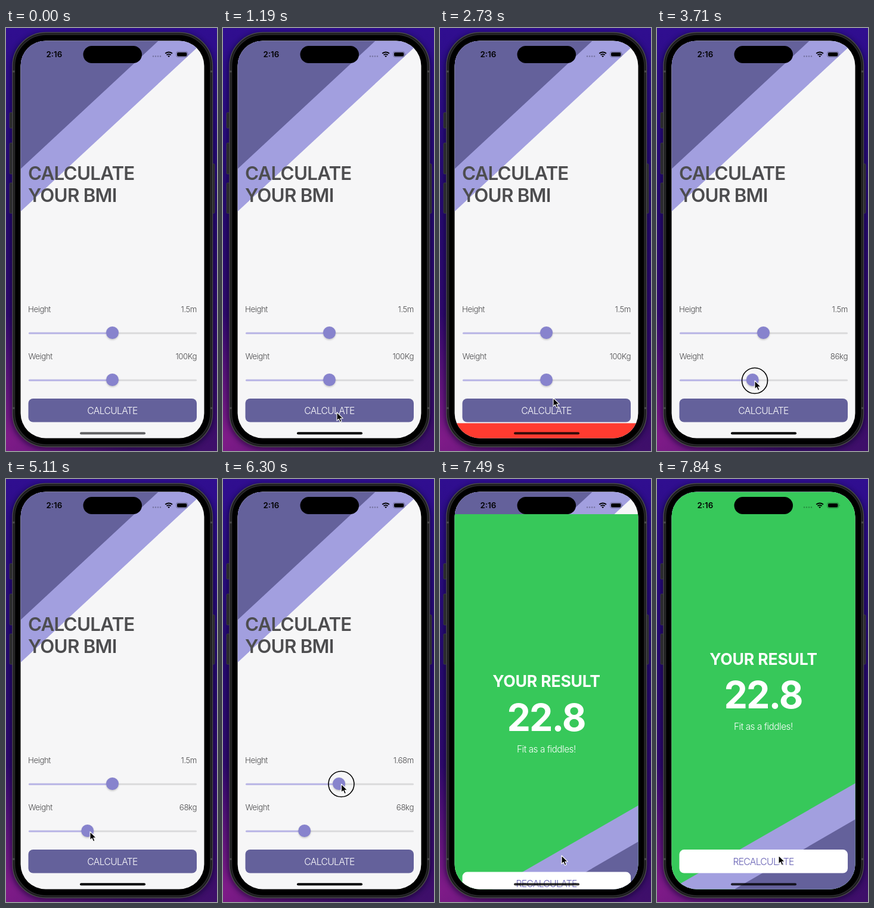
These frames come from a looping animation (354 by 710 pixels, 8000 ms). An HTML page:

```html
<!DOCTYPE html>
<html lang="en">
<head>
<meta charset="utf-8">
<title>BMI calculator</title>
<style>
  html, body { margin: 0; width: 100%; height: 100%; overflow: hidden; background: #2d0b72; }
  svg { display: block; width: 354px; height: 710px; }
  text { font-family: Inter, "Liberation Sans", sans-serif; }
  .title { font-size: 31.3px; font-weight: 600; letter-spacing: -.024em; fill: #4d4d4f; }
  .label { font-size: 13.3px; font-weight: 300; letter-spacing: -.032em; fill: #4a4a4c; }
  .button { font-size: 15.66px; font-weight: 350; letter-spacing: -.043em; text-anchor: middle; }
  .result { fill: #fff; text-anchor: middle; }
  .end { text-anchor: end; }
</style>
</head>
<body>
<svg viewBox="0 0 354 710">
  <defs>
    <linearGradient id="wall" x2="0" y2="1">
      <stop offset="0" stop-color="#300e90"/>
      <stop offset=".4" stop-color="#260a70"/>
      <stop offset=".75" stop-color="#32096c"/>
      <stop offset="1" stop-color="#3f0f6a"/>
    </linearGradient>
    <radialGradient id="glow" gradientUnits="userSpaceOnUse" cx="0" cy="690" r="210">
      <stop offset="0" stop-color="#7f1b88"/>
      <stop offset="1" stop-color="#7f1b88" stop-opacity="0"/>
    </radialGradient>
    <filter id="blur" x="-20%" width="140%"><feGaussianBlur stdDeviation="5"/></filter>
    <filter id="soft" x="-50%" y="-50%" width="200%" height="200%"><feGaussianBlur stdDeviation="1.4"/></filter>
    <clipPath id="screen"><rect x="24.5" y="21.5" width="308" height="667" rx="42"/></clipPath>
  </defs>

  <rect width="354" height="710" fill="url(#wall)"/>
  <rect width="354" height="710" fill="url(#glow)"/>
  <rect x="9" y="9" width="339" height="697" rx="57" fill="#0c0325" opacity=".65" filter="url(#blur)"/>

  <g fill="#29292c" stroke="#424245" stroke-width=".8">
    <rect x="6" y="142" width="7" height="26" rx="1.5"/>
    <rect x="6" y="193" width="7" height="52" rx="1.5"/>
    <rect x="6" y="260" width="7" height="51" rx="1.5"/>
    <rect x="344" y="228" width="6" height="83" rx="1.5"/>
  </g>
  <rect x="11" y="7.5" width="335.5" height="695.5" rx="56" fill="#1b1b1d" stroke="#4a4a4d" stroke-width="1.4"/>
  <rect x="14.5" y="11" width="328.5" height="688.5" rx="53" fill="#000" stroke="#2c2c2e" stroke-width="1.5"/>
  <path d="M10.5 73h4M343 73h4M10.5 638h4M343 638h4" stroke="#4a4a4c" stroke-width="3"/>

  <g clip-path="url(#screen)">
    <rect x="24" y="21" width="309" height="668" fill="#f6f6f7"/>
    <path d="M24.5 21.5H333L24.5 308z" fill="#a29fdf"/>
    <path d="M24.5 21.5H255.7L24.5 236.4z" fill="#64619b"/>
    <text class="title" x="37" y="254.5">CALCULATE</text>
    <text class="title" x="37" y="291.5">YOUR BMI</text>

    <text class="label" x="37" y="477">Height</text>
    <text class="label end" x="320" y="477" id="heightText"></text>
    <text class="label" x="37.5" y="556">Weight</text>
    <text class="label end" x="320" y="556" id="weightText"></text>
    <g id="height" transform="translate(0 511.5)"></g>
    <g id="weight" transform="translate(0 590.5)"></g>

    <rect x="37.5" y="622" width="282.5" height="39.5" rx="8" fill="#64619b"/>
    <text class="button" x="178.5" y="647.5" fill="#fff">CALCULATE</text>

    <g id="modal">
      <rect id="sheet" x="24" y="21.5" width="309" height="669"/>
      <path d="M24.5 687.5L333 510.3V690H24.5z" fill="#a29fdf"/>
      <path d="M131 688L333 571V690H131z" fill="#64619b"/>
      <text class="result" x="178.5" y="311.5" font-size="26.6" font-weight="700" letter-spacing="-.2">YOUR RESULT</text>
      <text class="result" x="178" y="385" font-size="62.6" font-weight="700" letter-spacing="-1.9" id="score"></text>
      <text class="result" x="178.5" y="421" font-size="15.3" font-weight="300" letter-spacing="-.46" id="advice"></text>
      <rect x="37.5" y="622" width="282.5" height="39.5" rx="8" fill="#fff"/>
      <text class="button" x="178.5" y="647.5" fill="#625cb2">RECALCULATE</text>
    </g>

    <rect id="home" x="124" y="678.2" width="110" height="4" rx="2"/>
  </g>

  <rect x="129.5" y="30" width="98.5" height="29" rx="14.5"/>
  <text x="67.5" y="49" font-size="13.3" font-weight="600">2:16</text>
  <g opacity=".28">
    <circle cx="247" cy="47.5" r="1.2"/><circle cx="251" cy="47.5" r="1.2"/>
    <circle cx="255" cy="47.5" r="1.2"/><circle cx="259" cy="47.5" r="1.2"/>
  </g>
  <g fill="none" stroke="#000" stroke-width="2">
    <path d="M267.3 42.8a8.2 8.2 0 0 1 11.6 0"/>
    <path d="M269.6 45.4a5 5 0 0 1 7 0"/>
  </g>
  <path d="M271.2 47.1a2.8 2.8 0 0 1 3.8 0l-1.9 2z"/>
  <rect x="285.7" y="39.7" width="19" height="9" rx="2.8" fill="none" stroke="#000" stroke-opacity=".4" stroke-width=".8"/>
  <rect x="287" y="41" width="16.4" height="6.4" rx="1.7"/>
  <path d="M305.9 42.7q1.6 1.4 0 3z" opacity=".45"/>

  <g id="cursor">
    <circle id="ring" r="21.5" fill="none" stroke="#000" stroke-width="1.6"/>
    <path d="M0 0V14.2L3.2 11.2L5.5 16.4L8 15.3L5.8 10.2H10.2z" stroke="#fff" stroke-width="1.1" stroke-linejoin="round"/>
  </g>
</svg>
<script>
const LOOP = 8000, STEP = 70;
const $ = id => document.getElementById(id);

// [time, values...]
const CURSOR = [
  [70, 215, 712], [420, 191, 645], [2450, 191, 645], [2730, 190, 621],
  [3080, 182.3, 592], [3220, 182.3, 592], [3710, 164, 592], [4830, 141, 592],
  [5110, 141, 592], [5600, 182.3, 512], [5740, 182.3, 512], [6440, 202.5, 512],
  [6580, 202.5, 512], [6930, 204, 632]
];
const WEIGHT = [[3220, 100], [3710, 86], [4830, 68]];
const HEIGHT = [[5740, 1.5], [6440, 1.73]];
const PRESSES = [[1050, 1190], [2380, 2450], [3150, 4970], [5670, 6510], [7070, 7210]];

function at(keys, t) {
  if (t <= keys[0][0]) return keys[0].slice(1);
  for (let i = 1; i < keys.length; i++) {
    const a = keys[i - 1], b = keys[i];
    if (t < b[0]) {
      const k = (t - a[0]) / (b[0] - a[0]);
      return a.slice(1).map((v, j) => v + (b[j + 1] - v) * k);
    }
  }
  return keys[keys.length - 1].slice(1);
}

// Critically damped spring from 0 to 1
function spring(t, rate = 0.019) {
  const x = Math.max(0, t) * rate;
  return 1 - (1 + x) * Math.exp(-x);
}

function makeSlider(id) {
  const g = $(id);
  g.innerHTML = `
    <rect x="38" y="-.8" width="282" height="3" rx="1.5" fill="#dadadc"/>
    <rect class="fill" x="38" y="-.8" height="3" rx="1.5" fill="#bab6e7"/>
    <g class="thumb">
      <circle cy="1.5" r="10.5" opacity=".2" filter="url(#soft)"/>
      <circle r="10.5" fill="#8783cd"/>
    </g>`;
  const fill = g.querySelector('.fill'), thumb = g.querySelector('.thumb');
  return part => {
    const x = 48 + 261 * part;
    fill.setAttribute('width', x - 38);
    thumb.setAttribute('transform', `translate(${x} 0)`);
  };
}
const setHeight = makeSlider('height'), setWeight = makeSlider('weight');

function modalLevel(t) {
  if (t < 2460) return spring(t - 1490, 0.027);
  if (t < 5000) return 1 - spring(t - 2460);
  return spring(t - 7248);
}

function draw(time) {
  const t = Math.floor(time / STEP) * STEP;

  const [w] = at(WEIGHT, t), [h] = at(HEIGHT, t);
  setWeight(w / 200);
  setHeight(h / 3);
  $('weightText').textContent = Math.round(w) + (t <= 3220 ? 'Kg' : 'kg');
  $('heightText').textContent = (t <= 5740 ? '1.5' : h.toFixed(2)) + 'm';

  const level = modalLevel(t), heavy = t < 5000;
  $('modal').setAttribute('transform', `translate(0 ${666 * (1 - level)})`);
  $('modal').style.display = level > 0.001 ? '' : 'none';
  $('sheet').setAttribute('fill', heavy ? '#ff3b30' : '#37c85a');
  $('score').textContent = heavy ? '44.4' : '22.8';
  $('advice').textContent = heavy ? 'Eat less kebabs!' : 'Fit as a fiddles!';
  $('home').setAttribute('fill', t < 420 ? '#626264' : '#000');
  $('home').setAttribute('fill-opacity', level > 0.01 ? 0.8 : 1);

  const [x, y] = at(CURSOR, t);
  $('cursor').setAttribute('transform', `translate(${x} ${y})`);
  $('cursor').style.display = t < 70 ? 'none' : '';
  $('ring').style.display = PRESSES.some(([a, b]) => t >= a && t < b) ? '' : 'none';
}

const start = performance.now();
function tick() {
  draw((performance.now() - start) % LOOP);
  requestAnimationFrame(tick);
}
tick();
</script>
</body>
</html>
```
